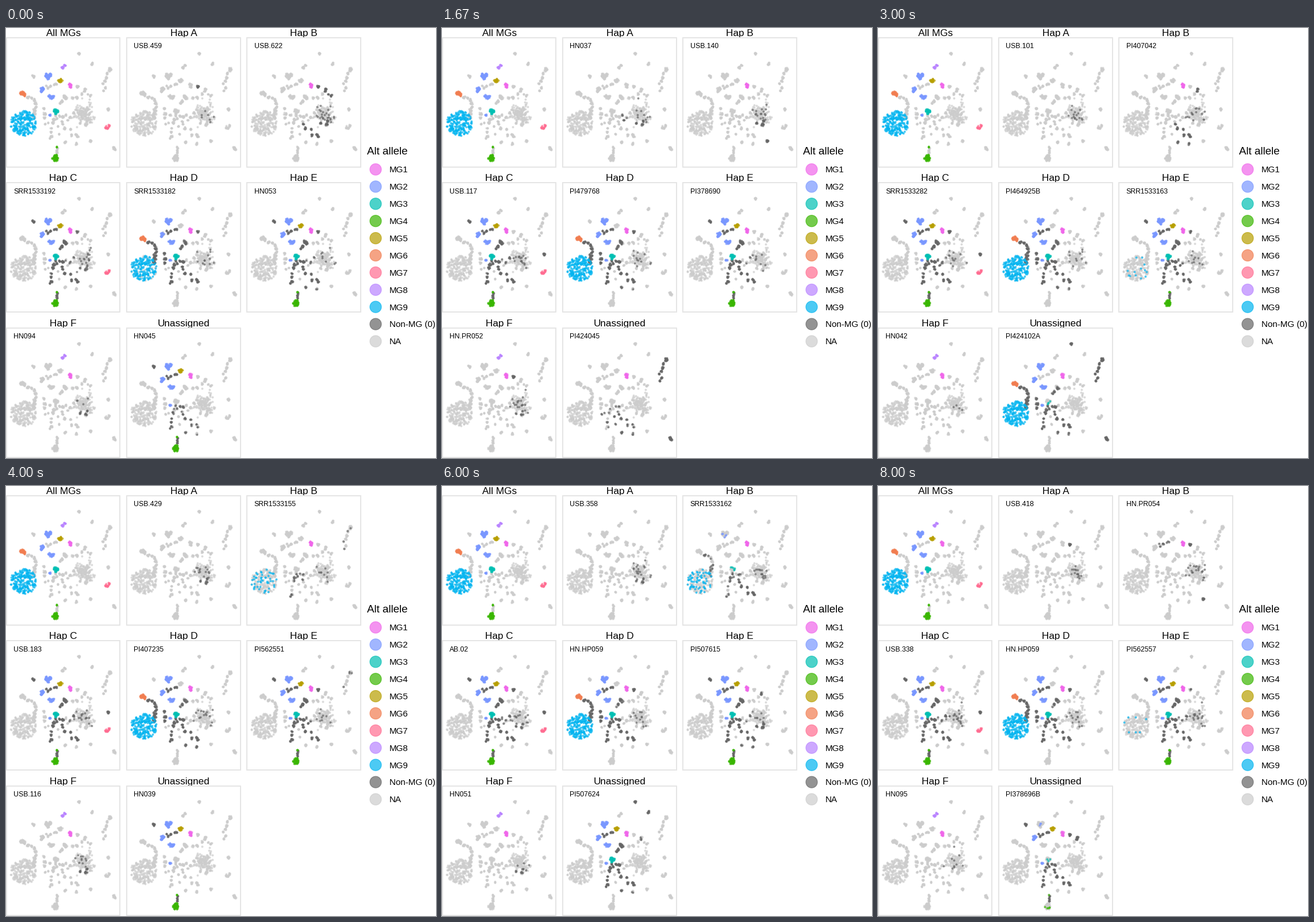
A matplotlib script that plays this animation: 748x748 px, repeating every 8.33 s.

```python
import numpy as np
import matplotlib.pyplot as plt
from matplotlib.animation import FuncAnimation
from matplotlib.patches import Circle, Rectangle

SIZE, DPI = 748, 64
PT = 72 / DPI  # points per pixel
FRAMES, INTERVAL, STEPS = 119, 70, 25
STEP_MS = FRAMES * INTERVAL / STEPS

COLOURS = {
    "MG1": "#F066EA", "MG2": "#7997FF", "MG3": "#00BFB3", "MG4": "#39B600",
    "MG5": "#B79F00", "MG6": "#F17D50", "MG7": "#FF6C91", "MG8": "#B983FF",
    "MG9": "#00B4F0", "Non-MG (0)": "#666666", "NA": "#CCCCCC",
}
DARK, PLAIN = "Non-MG (0)", "NA"

plt.rcParams["font.family"] = "Liberation Sans"
rng = np.random.RandomState(7)
groups = {}


def disc(x, y, r, n):
    angle = rng.uniform(0, 2 * np.pi, n)
    dist = r * np.sqrt(rng.uniform(0, 1, n))
    return np.column_stack([x + dist * np.cos(angle), y + dist * np.sin(angle)])


def spots(name, *discs):
    groups[name] = np.vstack([disc(x, y, r, int(3 + 1.5 * r * r)) for x, y, r in discs])


# Embedding clusters, placed in the first panel
spots("MG1", (111, 98, 2.4), (112, 102, 2))
spots("MG2a", (70.5, 82, 3.2), (76, 82, 3.2), (72, 86.5, 2.5))
spots("MG2b", (62.5, 105, 3), (61, 109, 2.2))
spots("MG2c", (74.5, 118, 1.8), (78, 121, 3), (82, 119, 1.8))
spots("MG2d", (76, 151, 1.6))
spots("MG3", (84, 143, 2.4), (88, 144, 2.6), (86, 148, 2))
spots("MG4", (85, 227, 5), (86, 223, 3), (88, 206, 0.8))
spots("MG5", (94, 91, 3.6))
spots("MG6", (27, 113, 3.5), (31.5, 115, 2.8))
spots("MG7", (175, 172.5, 2.8), (179, 170, 1.8))
spots("MG8", (98, 68, 2), (102, 65, 1.7))
groups["MG9"] = disc(30, 165.5, 22.5, 225)
groups["cloud"] = rng.normal((134, 150), (8.5, 8.5), (165, 2))
spots("rim", (129, 165, 1.6), (139, 167, 2), (140, 161, 1.5))
spots("haze", (104, 151, 1.3), (111, 155, 1.8), (117, 147, 1.8), (107, 160, 1))
spots("knot", (47, 84, 2.4))
spots("bridge", (72, 104, 1.4), (77, 101, 1.8), (84, 98, 1), (87, 97, 1.4), (70, 100, 0.8))
spots("fork", (101, 119, 2.6), (104, 121.5, 2.2), (97, 127, 2.4), (94, 131, 1.4))
spots("pin", (124, 100, 2), (124, 103, 1.2))
spots("dash", (137.5, 107, 2), (136, 110, 1.2))
spots("dot", (147, 117, 1.8), (142, 115, 0.8))
spots("mid", (115, 122, 1.8), (123, 121, 2.2), (131, 114, 1.6))
spots("tail", (38, 120, 2.2), (44, 122, 1.8), (49, 125, 2.2), (51, 131, 2.2),
      (51, 137, 2.2), (49, 143, 2.5), (49, 149, 2.5), (48, 155, 2.5))
spots("left", (65, 140, 1.8), (67, 149, 2.5), (66, 156, 1.8))
spots("core", (86, 152, 1.6), (88, 157, 1.2), (83, 159, 2), (81, 165, 2), (78, 174, 1),
      (78, 181, 1.6), (79, 188, 2), (76, 191, 1), (92, 153, 1.6), (98, 154, 2.5), (97, 162, 1.5))
spots("lower", (98, 167, 1.2), (101, 174, 2), (112, 176, 1.4),
      (113, 186, 1.8), (122, 185, 1.8), (124, 189, 1.8))
spots("sparse", (68, 167, 1), (73, 165, 0.8), (90, 171, 1.2), (92, 184, 1))
spots("feet", (103, 198, 2), (122, 201, 1.8))
spots("lone", (147, 196, 2))
spots("stem", (89, 209, 1.2), (88, 213, 1.2), (88, 217, 1.3))
spots("peak", (127, 44, 2.2))
spots("rise", (149, 62, 2.2))
spots("plume", (180, 72, 3), (176, 79, 1.8), (174, 86, 2), (172, 92, 1.7),
      (168, 97, 1.2), (173, 103, 1.7), (170, 108, 1.2))
spots("east", (177, 141, 2.2))
spots("corner", (187, 209, 2.6), (189, 211, 1.5))

ranks = {name: rng.uniform(0, 1, len(pts)) for name, pts in groups.items()}

# Per panel: title, groups always shown, then "sample extra-groups[:fraction]" per step
PANELS = [
    ("All MGs", "MG", [""]),
    ("Hap A", "", [
        "USB.459 pin cloud:.06", "USB.212 cloud:.1", "HN021 pin cloud:.05",
        "USB.385 cloud:.12", "HN037 cloud:.1 haze:.3 rim:.6", "USB.307 pin cloud:.04",
        "HN062 cloud:.1", "USB.276 cloud:.08 rim", "USB.101 cloud:.13",
        "USB.344 pin cloud:.1", "HN018 cloud:.07", "USB.429 cloud:.1 rim:.5",
        "USB.053 pin cloud:.06", "HN071 cloud:.1", "USB.463 pin rim cloud:.12 haze:.3",
        "USB.188 cloud:.08", "USB.236 cloud:.1 pin", "USB.358 cloud:.14 rim:.5",
        "USB.402 cloud:.1", "HN029 pin cloud:.06", "USB.367 cloud:.1 rim:.4",
        "USB.091 cloud:.08 rim:.5", "USB.145 cloud:.07", "USB.418 pin cloud:.06"]),
    ("Hap B", "MG1", [
        "USB.622 pin dash dot rim cloud:.22 lower", "USB.140 rim cloud:.08 lone",
        "PI407050 dash lower cloud:.08", "USB.230 cloud:.07 lower:.4",
        "USB.140 rim cloud:.08 lone", "USB.518 pin cloud:.1 lower:.5",
        "HN.PR061 dash lone cloud:.1", "USB.604 cloud:.12 rim",
        "PI407042 dash:.7 lower feet:.5 cloud:.07", "USB.571 pin cloud:.1",
        "USB.230 cloud:.07 lower:.4", "SRR1533155 MG9:.2 plume:.1 core:.3 cloud:.07",
        "USB.622 pin dash dot rim cloud:.22 lower", "HN.PR054 pin cloud:.1 lone",
        "USB.140 rim cloud:.08 lone", "USB.533 dash cloud:.12",
        "USB.590 pin lower cloud:.08",
        "SRR1533162 MG9:.3 MG3:.3 MG2a:.06 tail:.15 core:.3 lower cloud:.06",
        "USB.612 cloud:.1 lone", "PI407058 dash lower cloud:.07", "USB.545 rim cloud:.1",
        "USB.230 cloud:.06 rim:.5 lower:.4", "USB.581 pin cloud:.1",
        "HN.PR054 pin cloud:.1 lone bridge:.25"]),
    ("Hap C", "MG1 MG2 MG3 MG4 MG5 MG7 knot bridge fork core lower stem haze:.4 cloud:.07", [
        "SRR1533192 pin:.3 rim:.5", "AB.01 east", "USB.203 east", "USB.261 pin",
        "USB.117 east", "USB.342 east", "USB.527 pin east", "HN077",
        "SRR1533282 pin east", "USB.315 east", "SRR1533240 pin:.4", "USB.183 east",
        "USB.183 east", "USB.154 east feet:.5", "USB.174 east", "USB.174 east",
        "USB.196 pin east", "AB.02 pin east rim:.4", "USB.221 east", "USB.410 east pin",
        "USB.377 east", "USB.655 pin east feet:.5", "SRR1533274 pin:.3", "USB.338 east"]),
    ("Hap D", "MG1 MG2 MG3 MG6 MG9 bridge fork:.5 tail left core lower cloud:.08", [
        "SRR1533182 MG9:.78 MG2b:.6 pin:.3", "PI479752 pin", "HN.HP063", "PI464910 feet:.5",
        "PI479768 pin:.6 feet:.4", "SRR1533176 MG9:.85", "PI407240 pin", "HN.HP059 pin",
        "PI464925B feet:.4", "PI479760 MG5:.4", "SRR1533188 pin:.5", "PI407235 feet:.5",
        "HN.HP063", "PI479744 pin", "PI407228 MG5:.5 MG4:.35 knot:.3 pin dash:.4 feet:.5 stem",
        "SRR1533179 MG9:.85", "PI464933 pin", "HN.HP059 pin", "PI479752 feet:.5",
        "PI407240 pin", "SRR1533182 MG9:.78", "SRR1533193 pin:.3", "PI464918 pin",
        "HN.HP059 pin"]),
    ("Hap E", "MG1 MG2 MG3 MG4 MG5 knot bridge fork core lower stem haze:.3 cloud:.07", [
        "HN053 pin:.4 feet:.5", "PI562540", "PI424015 pin", "HN047 feet:.5", "PI378690",
        "PI507602 pin", "PI562549", "PI424019 MG7:.2", "SRR1533163 MG9:.03 pin:.7",
        "PI507609 dash", "HN066", "PI562551 pin plume:.05", "PI424007 MG9:.3 MG6:.3",
        "PI378702 pin", "PI378690", "PI507621 dash feet:.5", "HN053 feet:.5",
        "PI507615 dash:.5 feet:.5 rim", "PI562540", "PI424015 pin", "PI378702",
        "PI424007 MG9:.32 MG6:.35 pin:.3", "HN047 pin", "PI562557 MG9:.02 pin:.3"]),
    ("Hap F", "MG8 MG1 cloud:.04", [
        "HN094 rim:.7", "USB.116 rim", "USB.109 pin", "HN088", "HN.PR052 pin cloud:.09 rim:.5",
        "HN051 rim", "HN095 cloud:.07", "USB.116 rim", "HN042", "HN094 rim:.7", "HN042",
        "USB.116 rim:.7", "HN051 rim:.5", "USB.116 rim:.7", "USB.116 rim:.7",
        "USB.116 rim:.7", "USB.116 rim:.7", "HN051 rim:.5", "USB.109 pin", "HN042",
        "HN094 rim:.7", "HN.PR052 pin cloud:.09 rim:.5", "HN042", "HN095 cloud:.07"]),
    ("Unassigned", "MG1", [
        "HN045 MG2 MG4 MG5 knot bridge core:.4 lower:.5 stem feet:.3",
        "PI424031 plume corner lower", "PI407180 MG2 MG4 MG5 knot bridge fork core stem",
        "USB.163 MG2 MG3 MG4 core lower stem",
        "PI424045 plume corner lower:.5 feet:.5 core:.15 sparse:.4",
        "PI424077 MG2 MG3 fork core", "PI407211 MG2b MG2c MG3 fork core lower",
        "HN058 MG2 MG4 MG5 knot bridge core stem",
        "PI424102A MG2 MG6 MG9 MG3:.1 tail left peak plume corner core:.6 lower fork:.5 feet:.4",
        "PI378684 MG2 MG4 MG5 knot bridge core:.6 stem",
        "PI507630 MG2 MG3 MG4 MG5 fork core lower stem", "HN039 MG2 MG4 MG5 knot bridge stem",
        "PI378691 MG2b MG4:.4 MG5 knot core:.6 stem", "PI424088 MG2 plume corner lower",
        "USB.128 MG2b MG2c MG3 bridge:.4 fork core lower feet:.6 dash:.6 dot",
        "PI507618 MG2 MG3 peak fork core", "HN034 MG2 MG4 MG5 knot bridge core:.5 stem",
        "PI507624 MG2 MG3 MG5 peak rise bridge fork core lower feet:.6 dash:.4",
        "PI507628 MG2 MG3 MG5 peak fork core lower", "USB.135 MG2b MG2c MG3 fork core",
        "PI424060 plume corner lower feet:.5",
        "PI407229 MG2 MG3 MG4 MG5 MG6:.8 MG9:.8 tail:.8 left:.7 core lower fork pin "
        "bridge plume corner feet:.5 cloud:.05 stem",
        "PI378699 MG2 MG5 knot bridge fork core",
        "PI378696B MG1:.8 MG2b MG2d MG2a:.06 MG3:.1 MG4:.12 MG5 knot pin dash "
        "bridge core:.6 lower stem"]),
]


def origin(i):
    return np.array([209.3 * (i % 3), 252.4 * (i // 3)])


def shown_share(tokens):
    share = dict.fromkeys(groups, 0)
    for token in tokens:
        key, _, part = token.partition(":")
        for name in groups:
            if name.startswith(key):
                share[name] = float(part or 1)
    return share


def build(step):
    """Points of each colour over all panels, and the sample names."""
    buckets = {key: [] for key in COLOURS}
    names = []
    for i, (_, base, samples) in enumerate(PANELS):
        label, *extra = (samples[step % len(samples)].split() or [""])
        names.append(label)
        shift = sum(j * ord(c) for j, c in enumerate(label, 1)) * 0.137
        for name, share in shown_share(base.split() + extra).items():
            lit = (ranks[name] + shift) % 1 < share
            pts = groups[name] + origin(i)
            buckets[name[:3] if name.startswith("MG") else DARK].append(pts[lit])
            buckets[PLAIN].append(pts[~lit])
    return {key: np.vstack(parts) for key, parts in buckets.items()}, names


states = [build(step) for step in range(STEPS - 1)]

fig = plt.figure(figsize=(SIZE / DPI, SIZE / DPI), dpi=DPI, facecolor="white")
ax = fig.add_axes([0, 0, 1, 1])
ax.set(xlim=(0, SIZE), ylim=(SIZE, 0))
ax.axis("off")


def write(x, y, text, px, **kw):
    return ax.text(x, y, text, fontsize=px * PT, color="black", va="baseline", **kw)


labels = []
for i, (title, _, _) in enumerate(PANELS):
    x, y = origin(i)
    write(x + 99.6, y + 14, title, 17.1, ha="center", zorder=1)
    ax.add_patch(Rectangle((x + 0.8, y + 17), 197.6, 225, fc="white", ec="#E5E5E5",
                           lw=2 * PT, zorder=2))
    labels.append(write(x + 13.2, y + 35.3, "", 12.3, zorder=5))

write(628.5, 219.5, "Alt allele", 18.8)
for row, (key, colour) in enumerate(COLOURS.items()):
    y = 246 + 29.9 * row
    ax.add_patch(Circle((643, y), 10, color=colour, alpha=0.7, lw=1.2 * PT))
    write(667, y + 5.4, key, 15.1)

dots = {
    key: ax.plot([], [], "o", ms=3.9 * PT, mew=0, color=colour, alpha=0.7,
                 zorder={PLAIN: 3, DARK: 3.1}.get(key, 3.2))[0]
    for key, colour in COLOURS.items()
}


def update(frame):
    tick = int((frame * INTERVAL + INTERVAL - 5) / STEP_MS)
    points, names = states[max(tick, 1) - 1]  # the first state holds for two ticks
    for key, line in dots.items():
        line.set_data(points[key][:, 0], points[key][:, 1])
    for label, name in zip(labels, names):
        label.set_text(name)
    return [*dots.values(), *labels]


animation = FuncAnimation(fig, update, frames=FRAMES, interval=INTERVAL,
                          repeat=True, repeat_delay=0, blit=False)
plt.show()
```
